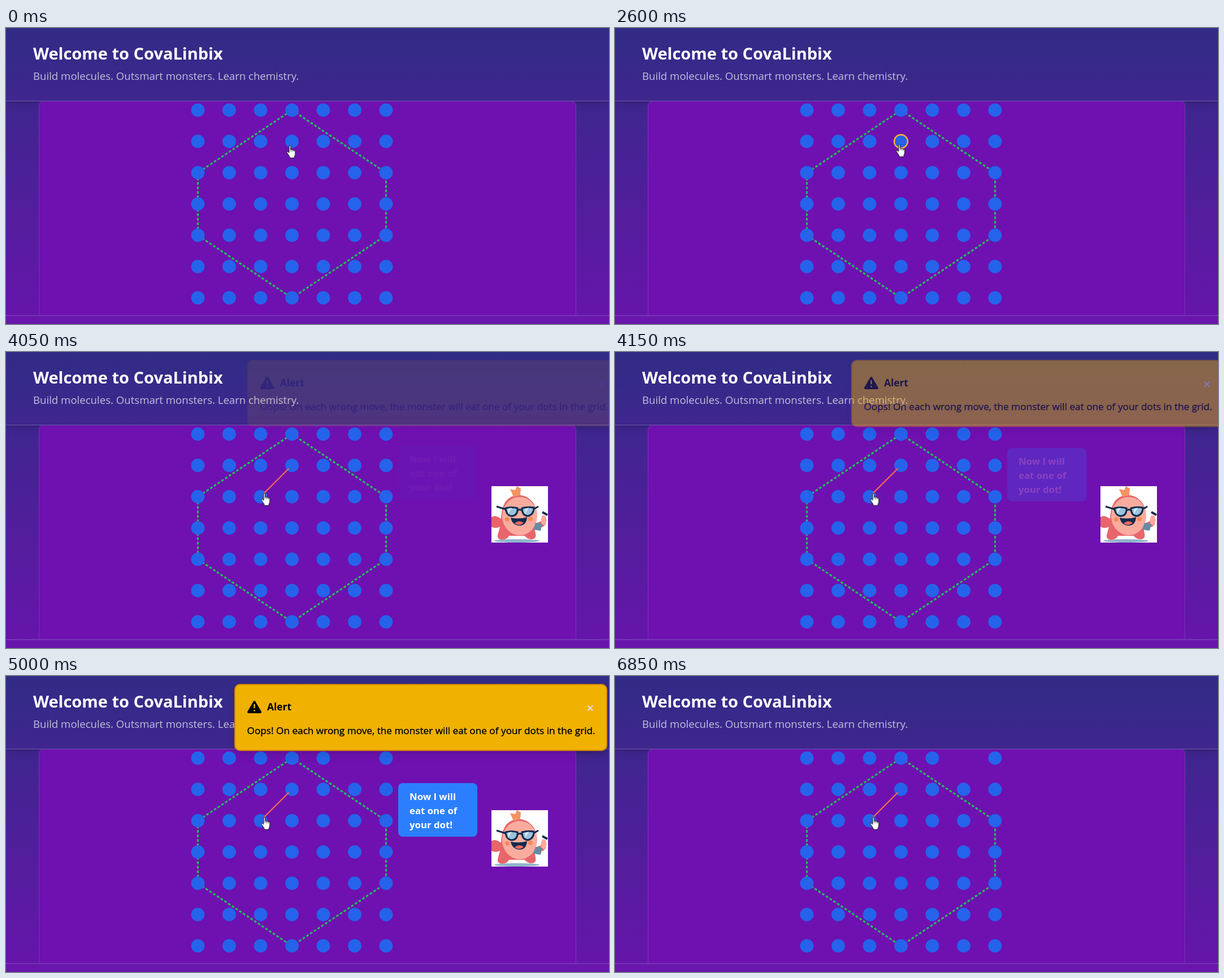
Write an HTML page that moves like this. It is 1067x525 px and loops after 7.1 s.

```html
<!DOCTYPE html>
<html lang="en">
<head>
<meta charset="utf-8">
<title>Dot grid game</title>
<style>
  html, body { margin: 0; width: 100%; height: 100%; overflow: hidden; background: #312c85; }
  svg { display: block; font-family: "Open Sans", "Noto Sans", sans-serif; }
  .bold { font-weight: 700; }
  #header { filter: drop-shadow(0 5px 6px rgba(0, 0, 0, .16)); }
  #alert { filter: drop-shadow(0 8px 7px rgba(0, 0, 0, .1)); }
  #bubble text { font-size: 16.8px; fill: #fff; }
</style>
</head>
<body>
<svg width="1067" height="525" viewBox="0 0 1067 525">
  <defs>
    <linearGradient id="page" gradientUnits="userSpaceOnUse" x1="0" y1="0" x2="0" y2="600">
      <stop offset="0" stop-color="#312c85"/>
      <stop offset="1" stop-color="#6e11b0"/>
    </linearGradient>
  </defs>

  <rect width="1067" height="525" fill="url(#page)"/>
  <rect id="header" width="1067" height="129" fill="url(#page)"/>
  <path d="M58.5 525V139.5q0-10 10-10H998.5q10 0 10 10V525" fill="#6e11b0" stroke="#7c2eb9"/>
  <path d="M0 129.5H1067" stroke="#6a58a8"/>
  <rect y="510" width="1067" height="15" fill="#6816ac"/>
  <path d="M0 510H1067" stroke="#7c3fb8" stroke-width="1.5"/>

  <text class="bold" x="48" y="56" font-size="29" fill="#fff">Welcome to CovaLinbix</text>
  <text x="48" y="92" font-size="18.6" fill="#c3bfdc">Build molecules. Outsmart monsters. Learn chemistry.</text>

  <path d="M506 145.7L672.5 256.7V367.7L506 478.7L339.5 367.7V256.7Z"
        fill="none" stroke="#22bb5e" stroke-width="3.17" stroke-dasharray="4.76 3.17"/>
  <g id="dots" fill="#2563eb"></g>
  <circle id="ring" cx="506" cy="201.2" r="11.9" fill="none" stroke="#fbb72c" stroke-width="2.4"/>
  <path id="move" d="M500.5 206.5L456.5 250.5" stroke="#f06a52" stroke-width="2.4"/>

  <g id="monster">
    <g transform="translate(859 238)">
      <rect width="100" height="100" fill="#fff"/>
      <ellipse cx="45" cy="97" rx="40" ry="3" fill="#8fb4cc"/>
      <path d="M17 58Q6 50 0 55V72Q7 76 15 72L11 87Q10 94 18 95Q28 95 31 88H59Q64 95 73 94Q80 92 78 84L76 73
               Q92 76 97 66L90 61L78 66Q85 42 72 27Q58 12 40 17Q18 23 17 58Z" fill="#e8656b"/>
      <ellipse cx="50" cy="53" rx="31" ry="34" fill="#f9ac9e"/>
      <path d="M39 19L33 5L42 7L45 0L52 4L51 16Z" fill="#f39462"/>
      <g fill="#9ac4de" stroke="#102a4c" stroke-width="3">
        <path d="M9 36L25 41M76 40L83 36M46 43Q50 40 54 43" fill="none"/>
        <path d="M25 39Q35 36 46 39Q47 52 36 53Q26 52 25 39ZM54 39Q64 36 75 38Q75 51 64 53Q54 52 54 39Z"/>
      </g>
      <path d="M30 40l6-2-7 12zM60 40l6-2-7 12z" fill="#dcebf3"/>
      <path d="M34 56Q49 59 63 55Q62 70 49 70Q37 69 34 56Z" fill="#102a4c"/>
      <path d="M41 66Q49 59 57 65Q49 72 41 66Z" fill="#ee6a62"/>
      <circle cx="28" cy="59" r="4" fill="#f28b58"/>
      <circle cx="69" cy="58" r="4" fill="#f28b58"/>
      <path d="M78 65L90 66L87 79L74 77Z" fill="#648ca6"/>
      <path d="M88 66Q86 56 91 51L96 53L98 61L94 70Z" fill="#f9ac9e"/>
      <path d="M90 46L99 51" stroke="#102a4c" stroke-width="4"/>
    </g>
  </g>

  <g id="bubble">
    <rect x="694" y="190" width="140" height="95" rx="8" fill="#2b7fff"/>
    <text class="bold" x="714" y="220">Now I will</text>
    <text class="bold" x="714" y="245">eat one of</text>
    <text class="bold" x="714" y="270">your dot!</text>
  </g>

  <g id="alert">
    <rect x="405" y="15" width="658" height="117" rx="9" fill="#f0b100" stroke="#d08700" stroke-width="2"/>
    <path d="M439.5 46L450 64H429Z" stroke="#000" stroke-width="4" stroke-linejoin="round"/>
    <path d="M439.500 50V57M439.500 60V62.500" stroke="#f0b100" stroke-width="2.5"/>
    <text class="bold" x="462" y="61" font-size="17.4">Alert</text>
    <path d="M1029 52.5L1038 61.5M1038 52.5L1029 61.5" stroke="#e2dcec" stroke-width="2"/>
    <text x="426.5" y="103" font-size="17.2" stroke="#000" stroke-width=".35">Oops! On each wrong move, the monster will eat one of your dots in the grid.</text>
  </g>

  <g id="cursor" stroke="#111" stroke-linejoin="round">
    <path fill="#fff" d="M4.6 2Q4.6.6 5.9.6Q7.2.6 7.2 2V8Q7.4 7 8.6 7.2Q10 7.4 10 8.6Q10.4 7.6 11.6 7.9
      Q12.9 8.2 12.9 9.5Q13.3 8.8 14.3 9.1Q15.6 9.5 15.6 11V15Q15.6 17 14.6 18.6Q13.8 20 13.8 22.4
      H6Q6 20.5 4.6 18.6L1.2 13.6Q.2 12 1.2 11.4Q2.3 10.8 3.4 12L4.6 13.3Z"/>
    <path d="M7.2 8V11M10 8.6V11.5M12.9 9.5V12" stroke-width=".7"/>
  </g>
</svg>

<script>
const LOOP = 7100, TICK = 50, HOLD = 'steps(1, end)';
const dots = document.querySelector('#dots');
const tracks = [];

for (let row = 0; row < 7; row++) {
  for (let col = 0; col < 7; col++) {
    const dot = document.createElementNS(dots.namespaceURI, 'circle');
    dot.setAttribute('cx', 339.5 + 55.5 * col);
    dot.setAttribute('cy', 145.7 + 55.5 * row);
    dot.setAttribute('r', 11.9);
    if (row === 0 && col === 5) dot.id = 'eaten';
    dots.append(dot);
  }
}

// Each step is [time in ms, properties, easing towards the next step].
function track(selector, ...steps) {
  steps.push([LOOP, steps.at(-1)[1]]);
  const frames = steps.map(([time, props, easing = HOLD]) => ({ offset: time / LOOP, easing, ...props }));
  const animation = document.querySelector(selector).animate(frames, { duration: LOOP, iterations: Infinity });
  animation.pause();
  tracks.push(animation);
}

function show(selector, from, to) {
  track(selector, [0, { opacity: 0 }], [from, { opacity: 1 }], [to, { opacity: 0 }]);
}

const pose = (opacity, x, y) => ({ opacity, transform: `translate(${x}px, ${y}px)` });
const at = (x, y) => pose(1, x, y);

// Fades in while sliding to its resting place, then vanishes at once.
function slideIn(selector, x, y, start, duration, end) {
  track(selector,
    [0, pose(0, x, y)],
    [start, pose(0, x, y), 'ease'],
    [start + duration, at(0, 0)],
    [end, pose(0, 0, 0)]);
}

show('#ring', 1750, 4050);
show('#move', 4050, LOOP - 1);
show('#monster', 4050, 5950);
track('#eaten', [0, { opacity: 1 }], [5000, { opacity: 0 }]);
slideIn('#alert', 25, 0, 3990, 600, 6850);
slideIn('#bubble', 0, -25, 3990, 1000, 5950);

track('#cursor',
  [0, at(496.3, 208)],
  [700, at(496.3, 208), 'ease-in-out'],
  [900, at(497.4, 205.5)],
  [2550, at(497.4, 205.5), 'ease-in-out'],
  [3300, at(457, 244.5), 'ease-out'],
  [3450, at(451.2, 249.7)]);

const start = performance.now();
function render() {
  const elapsed = (performance.now() - start) % LOOP;
  const time = Math.floor(elapsed / TICK) * TICK;
  for (const animation of tracks) animation.currentTime = time;
  requestAnimationFrame(render);
}
render();
</script>
</body>
</html>
```
